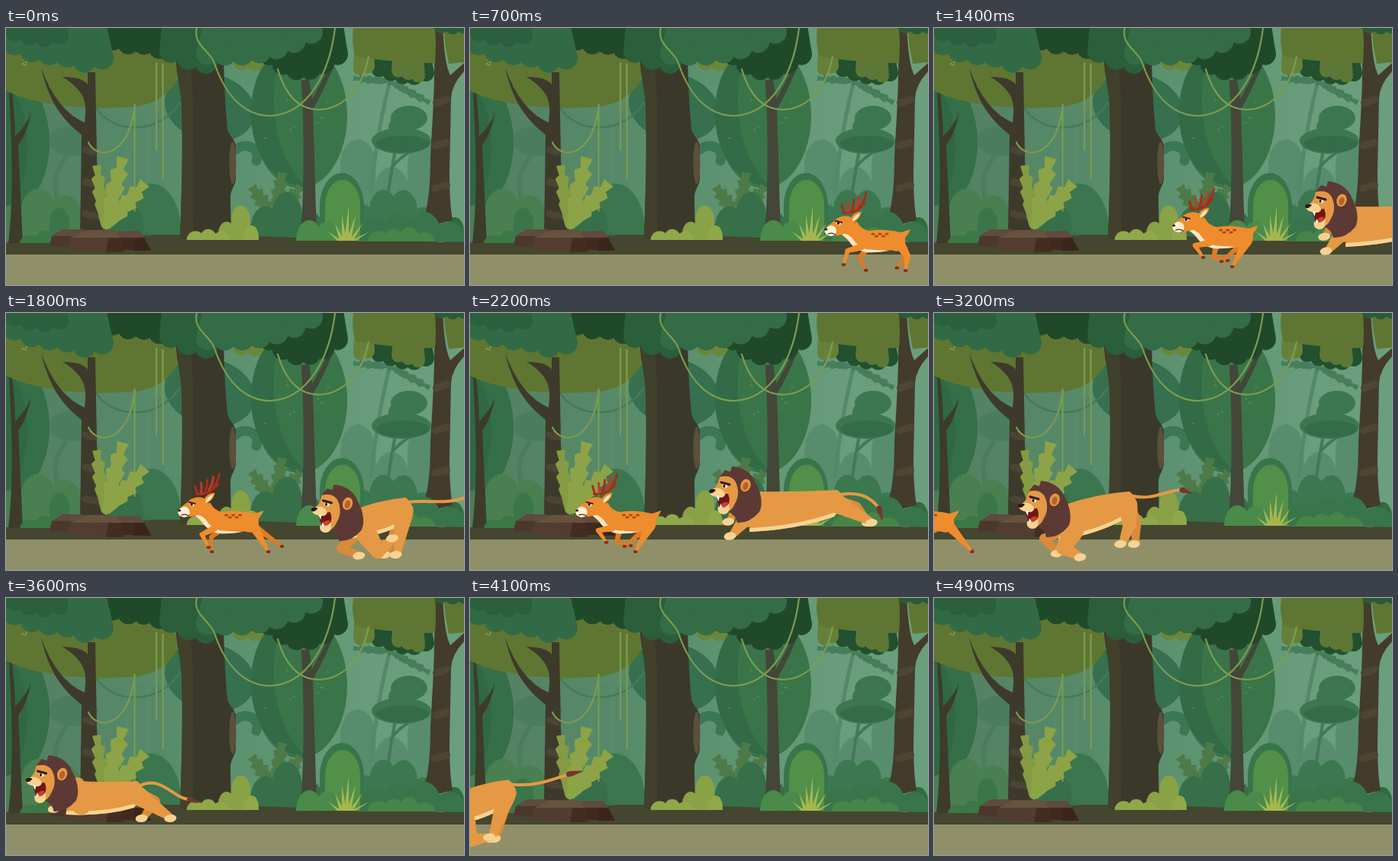
Recreate the animation shown at these times as an HTML page with a canvas. Size 600 by 337 pixels, loop 5 s.

```html
<!DOCTYPE html>
<html lang="en">
<head>
<meta charset="utf-8">
<title>Forest chase</title>
<style>
html, body { margin: 0; width: 100%; height: 100%; overflow: hidden; background: #8f9069; }
canvas { display: block; width: 100vw; height: 100vh; }
</style>
</head>
<body>
<canvas id="stage" width="600" height="337"></canvas>
<script>
const W = 600, H = 337, LOOP = 5000, STEP = 100, STRIDE = 800;
const { sin, cos, PI } = Math;
const view = document.getElementById('stage').getContext('2d');
const scenery = document.createElement('canvas');
scenery.width = W; scenery.height = H;
let c = scenery.getContext('2d');

// ---- helpers ----
let seed = 7;
const rnd = () => (seed = seed * 16807 % 2147483647) / 2147483647;
const mix = (a, b, u) => a + (b - a) * u;
const fill = (color, d) => { c.fillStyle = color; c.fill(new Path2D(d)); };
const line = (color, w, d) => {
  c.strokeStyle = color; c.lineWidth = w; c.lineCap = c.lineJoin = 'round';
  c.stroke(new Path2D(d));
};
const oval = (color, x, y, rx, ry, turn = 0) => {
  c.fillStyle = color; c.beginPath(); c.ellipse(x, y, rx, ry, turn, 0, 2 * PI); c.fill();
};

// bush with a round top and straight sides
function dome(color, x0, x1, top, base) {
  const r = (x1 - x0) / 2, cy = Math.min(base, top + r * 1.5);
  c.fillStyle = color; c.beginPath();
  c.ellipse(x0 + r, cy, r, cy - top, 0, PI, 2 * PI);
  c.lineTo(x1, base); c.lineTo(x0, base); c.fill();
}
// row of domes, tallest in the middle
function shrub(color, x0, x1, top, base, n) {
  const w = (x1 - x0) / n;
  for (let i = 0; i < n; i++) {
    const h = (base - top) * mix(.5, 1, sin(PI * (i + .5) / n)) * mix(.85, 1, rnd());
    dome(color, x0 + w * (i - .2), x0 + w * (i + 1.2), base - h, base);
  }
}
// hanging leaves whose tips follow a sagging rim
function leaves(color, x0, x1, top, y0, y1, sag, n, r) {
  for (let i = 0; i <= n; i++) {
    const u = i / n, x = mix(x0, x1, u);
    const y = mix(y0, y1, u) + sag * sin(PI * u) + (rnd() - .5) * 6;
    line(color, 2 * r, `M${mix(x, (x0 + x1) / 2, .2)} ${top}L${x} ${y - r}`);
  }
}
function frond(color, x0, y0, x1, y1, w) {
  const dx = x1 - x0, dy = y1 - y0, len = Math.hypot(dx, dy), n = 5, side = [[], []];
  for (let i = 0; i < n; i++) {
    const wide = w * sin(PI * (i + 1) / (n + 1.3));
    [1, -1].forEach((s, k) => {
      const at = (f, h) => [x0 + dx * f - s * dy / len * h, y0 + dy * f + s * dx / len * h];
      side[k].push(at(i / n + .05, wide * .6), at((i + 1) / n, wide));
    });
  }
  fill(color, `M${x0} ${y0}L${side[0].join('L')}L${x1} ${y1}L${side[1].reverse().join('L')}Z`);
}
function specks(color, x, y, w, h, n) {
  while (n--) oval(color, x + w * rnd(), y + h * rnd(), 1.3, 1.3);
}
function rock(x, y, w, h, lean, tones) {
  const k = w * .3, mid = y + h * .35;
  fill(tones[0], `M${x} ${mid}L${x + k} ${y}H${x + w - k * .4}L${x + w} ${mid}Z`);
  fill(tones[1], `M${x} ${mid}H${x + w}L${x + w + lean} ${y + h}L${x - lean} ${y + h * .9}Z`);
  fill(tones[2], `M${x + w * .75} ${mid}H${x + w}L${x + w + lean} ${y + h}H${x + w * .7}Z`);
}

// ---- forest ----
function farWoods() {
  const sky = c.createLinearGradient(0, 0, W, 0);
  sky.addColorStop(0, '#527f60'); sky.addColorStop(.5, '#5c9170'); sky.addColorStop(.85, '#6a9e7c');
  c.fillStyle = sky; c.fillRect(0, 0, W, H);
  for (let i = 0; i < 3; i++) dome('#548868', 138 + i * 26, 156 + i * 26, 110, 260);
  oval('#4a7d5c', 88, 148, 32, 20);
  line('#4a7d5c', 6, 'M67 225C60 190 70 182 84 160');
  for (let i = 0; i < 3; i++) dome('#578d6c', 438 + i * 44, 484 + i * 44, 146 + i % 2 * 36, 265);
  line('#548968', 5, 'M503 70C492 110 484 160 478 215');
  for (let i = 0; i < 5; i++) frond('#487d5a', 502, 70, 455 + i * 25, 66 + i * i * 2, 6);
  line('#45775a', 4, 'M500 220Q506 180 512 150M505 184Q514 170 540 156');
  oval('#3c774f', 528, 118, 24, 16);
  oval('#3c774f', 518, 130, 17, 14);
  oval('#3c774f', 518, 148, 39, 17);
  oval('#346c48', 520, 152, 35, 11);
  oval('#36704e', 267, 104, 60, 44, .25);
  line('#3b7655', 13, 'M300 160C314 148 334 158 328 174');
  line('#447a58', 2.5, 'M118 105C140 138 198 142 228 98');
  oval('#3a7549', 385, 115, 62, 95);
  fill('#326b45', 'M362 26C340 90 350 170 395 209C300 200 305 50 362 26Z');
  oval('#346f47', 4, 150, 53, 88);
  oval('#2f6842', -14, 155, 42, 86);
  specks('#548a50', 340, 80, 100, 70, 10);
}

function undergrowth() {
  shrub('#4a7f51', -10, 130, 205, 290, 4);
  dome('#3a764a', 57, 83, 236, 290);
  dome('#3b764f', 150, 229, 204, 290);
  dome('#366f49', 132, 180, 226, 290);
  [322, 362, 386].forEach((x, i) => frond('#4e7a49', 352, 250, x, 208 - 18 * (i % 2), 11));
  shrub('#3b774f', 455, 560, 205, 290, 4);
  shrub('#376f48', 326, 410, 214, 290, 3);
  dome('#32693f', 575, 600, 248, 290);
  fill('#45462f', 'M0 281C80 280 130 271 200 271C330 271 430 278 600 281V299H0Z');
  c.fillStyle = '#8f9069'; c.fillRect(0, 297, W, 40);
}

function trunks() {
  fill('#3d3b2c', 'M4 82H8C10 108 12 120 12 142Q28 126 33 110Q28 138 16 154L22 282H3C9 235 9 170 4 82Z');
  fill('#434638', 'M386 60H396L401 93C412 74 424 50 432 28H436Q428 60 402 107L407 272H386C391 210 391 120 386 60Z');
  fill('#5f7632', 'M-5 10H236C234 68 216 96 170 103C95 109 25 98 -5 79Z');
  specks('#8c9c4b', 16, 18, 32, 32, 9);
  fill('#3e3a2b', 'M107 58H117L119 170L123 250L131 268H97L99 140C82 126 58 106 46 52Q66 108 103 124C106 100 106 84 74 64Q100 64 107 74Z');
  fill('#3a3929', 'M223 34H285Q286 90 290 132C292 142 301 146 301 156V198C300 208 294 212 294 222L295 277H228C230 220 232 160 230 100C228 70 222 60 223 34Z');
  fill('#40402c', 'M240 40C250 90 242 190 246 277H228C230 220 232 160 230 100L223 36Z');
  oval('#5b503a', 297, 177, 4.5, 28);
  fill('#433c2b', 'M560 0H572C574 30 576 50 582 62L600 46V57Q584 74 583 92L581 190Q581 230 585 252L543 263C552 240 556 215 556 170C560 100 563 60 560 0Z');
  for (let i = 0; i < 3; i++) {
    line('#4a4534', 9, `M104 ${160 + i * 42}L${115 + i * 3} ${163 + i * 42}`);
    line('#4d4632', 10, `M${564 - i} ${98 + i * 56}L577 ${94 + i * 56}`);
  }
}

function canopy() {
  leaves('#23502f', 474, 550, 20, 58, 70, 8, 5, 11);
  leaves('#66803a', 464, 474, 30, 64, 60, 0, 1, 9);
  leaves('#5d7736', 514, 540, 30, 66, 72, 0, 2, 9);
  fill('#5f7632', 'M455 0H562Q564 24 562 46Q500 45 458 37Q452 20 455 0ZM573 0H600V45L580 47Q575 24 573 0Z');
  leaves('#6a863a', 290, 345, 15, 46, 48, 10, 3, 11);
  leaves('#567a38', 360, 390, 30, 54, 66, 3, 2, 10);
  leaves('#20492a', 345, 434, -20, 48, 46, 22, 5, 14);
  leaves('#20492a', 140, 262, -20, 30, 50, 0, 6, 14);
  leaves('#2b5e3b', 216, 262, -20, 44, 62, 0, 2, 15);
  leaves('#326a45', -12, 126, -20, 30, 56, 8, 6, 15);
  leaves('#2c5f3d', -8, 70, -20, 14, 24, 4, 4, 12);
  leaves('#346c46', 264, 400, -20, 46, 22, 10, 6, 15);
  leaves('#2b5a39', 570, 600, -20, 10, 10, 0, 2, 10);
  const vine = '#7c9b51';
  line(vine, 2.2, 'M250 0C244 22 268 30 273 46C290 96 318 116 348 115C395 112 424 60 431 0');
  line(vine, 2.2, 'M356 54C366 88 384 107 410 107C446 106 468 74 475 38');
  line(vine, 2.2, 'M197 46V160M205.5 48V198M168.5 100V240M108 150C118 172 158 172 168 108');
}

function nearPlants() {
  frond('#859b42', 128, 264, 119, 180, 10);
  frond('#8da347', 129, 264, 153, 170, 13);
  frond('#8da347', 130, 264, 182, 203, 13);
  shrub('#3c7746', 22, 98, 264, 282, 4);
  shrub('#38724a', 128, 186, 262, 272, 3);
  dome('#89a246', 295, 320, 233, 278);
  dome('#89a246', 278, 300, 254, 278);
  dome('#8fa84a', 312, 331, 259, 278);
  shrub('#8fa84a', 240, 290, 262, 278, 3);
  dome('#39754a', 411, 469, 190, 279);
  shrub('#39754a', 466, 597, 236, 280, 4);
  dome('#529049', 418, 464, 199, 279);
  shrub('#4a8a4a', 385, 434, 247, 279, 2);
  shrub('#468448', 478, 558, 260, 280, 4);
  for (let i = -3; i <= 3; i++)
    fill('#a5b650', `M${443 + i * 3} 279L${449 + i * 9} ${234 + Math.abs(i) * 11}L${449 + i * 3} 279Z`);
  rock(60, 264, 46, 24, 3, ['#5f4b3c', '#4b382c', '#432f24']);
  rock(134, 266, 47, 26, 9, ['#5f4b3c', '#40291e', '#3b251b']);
  rock(84, 265, 67, 29, 3, ['#67523f', '#523d30', '#432d21']);
}

farWoods(); undergrowth(); trunks(); canopy(); nearPlants();

// ---- animals, drawn relative to the tip of the nose ----
function limb(color, pts, w0, w1) {
  const n = (pts.length - 1) * 6;
  for (let i = 0; i <= n; i++) {
    const k = Math.min(Math.floor(i / 6), pts.length - 2), u = i / 6 - k;
    const r = mix(w0, w1, i / n), [p, q] = [pts[k], pts[k + 1]];
    if (i) line(color, 2 * r, `M${c.pen}L${c.pen = [mix(p[0], q[0], u), mix(p[1], q[1], u)]}`);
    else c.pen = p;
  }
}
// joint of a leg with two equal bones
function joint([x, y], [X, Y], bone, bend) {
  const d = Math.hypot(X - x, Y - y) || 1, h = bend * Math.sqrt(Math.max(0, bone * bone - d * d / 4));
  return [(x + X) / 2 + (Y - y) / d * h, (y + Y) / 2 - (X - x) / d * h];
}

function deer(t, a) {
  const x = 465 - .2176 * (t - 700);
  if (x < -150 || x > 612) return;
  const coat = '#ef8c2d', shade = '#df7b23', cream = '#fbe6c4', horn = '#a92c1a';
  const s = sin(a), k = cos(a);
  const leg = (color, hip, foot, bend, w) => {
    limb(color, [hip, joint(hip, foot, 19, bend), foot], w, 1.6);
    oval('#8b2e1b', foot[0], foot[1], 2.8, 2);
  };
  c.save(); c.translate(x, 262 + 5 * sin(2 * a));
  leg(shade, [58, 20], [58 - 20 * s + 14 * k, 47 + 10 * sin(a - .4)], -1, 4);
  leg(shade, [97, 16], [100 - 36 * k + 28 * s, 44 + 5 * s], 1, 5);
  fill(coat, 'M17 0L28 -12L42 -13Q47 -3 58 -1C75 -4 90 -1 100 1L112 -3Q109 4 105 8C107 22 98 28 90 25C80 23 66 28 54 27Q42 24 34 16Q27 7 17 0Z');
  fill(cream, 'M19 2Q29 8 34 16Q42 25 54 27Q68 28 84 25Q64 24 54 23Q42 19 37 10Q30 1 19 2Z');
  for (let i = 0; i < 5; i++) oval('#a84a19', 63 + i * 4.5, 3 + i % 2 * 3, 2.6, 1.5);
  leg(coat, [48, 20], [40 - 22 * s, 42 - 6 * cos(a + 1)], -1, 4.5);
  leg(coat, [98, 16], [98 - 20 * k + 31 * s, 51], 1, 7);
  line(horn, 3, 'M24 -25Q40 -22 52 -38');
  for (let i = 0; i < 5; i++)
    line(i % 2 ? '#c23a24' : horn, 3, `M${25 + i * 5} ${-24 - i * 2}Q${24 + i * 7} ${-28 - i * 3} ${22 + i * 8} ${-35 - i * 4}`);
  fill(coat, 'M0 -2C3 -9 10 -11 14 -16C20 -21 30 -22 35 -18Q41 -12 36 -4C30 4 16 6 6 5Q-2 2 0 -2Z');
  fill(coat, 'M33 -17Q39 -27 48 -26Q46 -16 35 -11Z');
  fill(cream, 'M36 -16Q40 -23 46 -24Q44 -17 36 -13Z');
  fill('#fff0d8', 'M0 -2C3 -8 9 -10 13 -6C17 0 15 5 7 6Q-2 3 0 -2Z');
  oval('#3a1a14', 1.5, -3, 2, 1.6);
  line('#5c2318', 1.2, 'M4 3Q9 1 14 4');
  oval('#fff', 18, -11, 3, 2.4); oval('#2c130f', 17.5, -11, 1.7, 2);
  line('#4a1c14', 2, 'M14 -14L22 -12');
  c.restore();
}

const lionPath = [[1400, 487], [2200, 314], [3200, 111], [4100, -79]];
function lionX(t) {
  const i = t < 2200 ? 0 : t < 3200 ? 1 : 2, [[t0, a], [t1, b]] = lionPath.slice(i);
  return mix(a, b, (t - t0) / (t1 - t0));
}

function lion(t, a) {
  const x = lionX(t);
  if (x < -236 || x > 602) return;
  const coat = '#e59944', shade = '#d98b3b', cream = '#f6d393', mane = '#5d3935';
  const s = sin(a), k = cos(a);
  // the back arches as the stride closes
  const rx = 145 + 22 * k, ry = -11 - 10 * s + 7 * k, chest = 43 + 8 * k;
  const leg = (color, hip, foot, bend, w) => {
    limb(color, [hip, joint(hip, foot, 27, bend), foot], w, 4.5);
    oval(cream, foot[0] - 2, foot[1], 8, 5, -.15);
  };
  const tip = [226, 4 + 31 * k - 23 * s], root = [rx + 4, ry + 6];
  const end = [tip[0] - 12 + 8 * k, tip[1] - 4 - 11 * k];
  const hind = [rx - 2, ry + 17], hindY = 48 - 9 * k;
  c.save(); c.translate(x, 248 - 12 * k + 7 * s);
  line(coat, 4, `M${root}C${root[0] + 28} ${root[1] + 10 * s - 4} ${end[0] - 20 + 10 * k} ${end[1] - 13 * k} ${end}`);
  limb('#75362f', [end, tip], 4, .8);
  leg(shade, [58, 30], [45 - 20 * cos(a + .35), 48 + 16 * sin(a - .7)], -1, 8);
  leg(shade, hind, [153 + 56 * k, hindY], 1, 10);
  const groin = [rx - 4, ry + 35], belly = [mix(52, rx, .55), mix(chest, ry + 35, .5) + 7];
  const body = new Path2D(`M52 ${chest}L56 -2Q${mix(56, rx, .5)} ${ry + 3} ${rx} ${ry}Q${rx + 17} ${ry + 12} ${groin}Q${belly} 52 ${chest}Z`);
  c.fillStyle = coat; c.fill(body);
  c.save(); c.clip(body);
  line(cream, 10, `M${groin}Q${belly} 52 ${chest}`);
  c.restore();
  leg(coat, hind, [163 + 58 * cos(a + .5), hindY], 1, 13);
  leg(coat, [72, 30], [68 - 42 * cos(a + .35), 46 + 22 * sin(a + .5)], -1, 14);
  fill(mane, 'M12 -20L20 -30L27 -28L29 -35Q52 -33 60 -14C68 0 70 16 65 25Q52 40 36 39Q35 30 24 24L30 -8Z');
  fill(coat, 'M1 -3C7 -6 11 -10 13 -21Q30 -25 35 -12C39 -2 37 8 33 14Q29 24 20 26L13 22L11 4Z');
  oval(coat, 47, -10, 6.5, 8.5, .3); oval('#b9602a', 47, -9, 3.5, 5.5, .3);
  fill('#6f1713', 'M9 3L24 1Q30 14 17 23Q10 17 9 3Z');
  fill('#d53b2e', 'M14 19Q16 10 24 12Q23 20 14 19Z');
  fill(cream, 'M11 18Q19 22 25 14Q28 28 17 28Q9 26 11 18Z');
  fill(cream, 'M0 0C0 -5 8 -8 15 -5C21 -1 22 4 16 6Q3 6 0 0Z');
  fill('#fff', 'M9 5H13L11.5 11ZM13 20L17 19L14 14Z');
  fill('#2b1512', 'M-1 -3Q3 -7 8 -4Q5 1 0 0Z');
  oval('#fff4d8', 20, -9, 3.4, 2.4); oval('#20100e', 19, -9, 1.6, 2);
  line('#3b1d19', 3, 'M15 -14L26 -11');
  c.restore();
}

function draw() {
  const t = Math.floor(performance.now() % LOOP / STEP) * STEP;
  const a = 2 * PI * (t - 600) / STRIDE;
  c = view;
  c.drawImage(scenery, 0, 0);
  deer(t, a);
  lion(t, a);
  requestAnimationFrame(draw);
}
draw();
</script>
</body>
</html>
```
